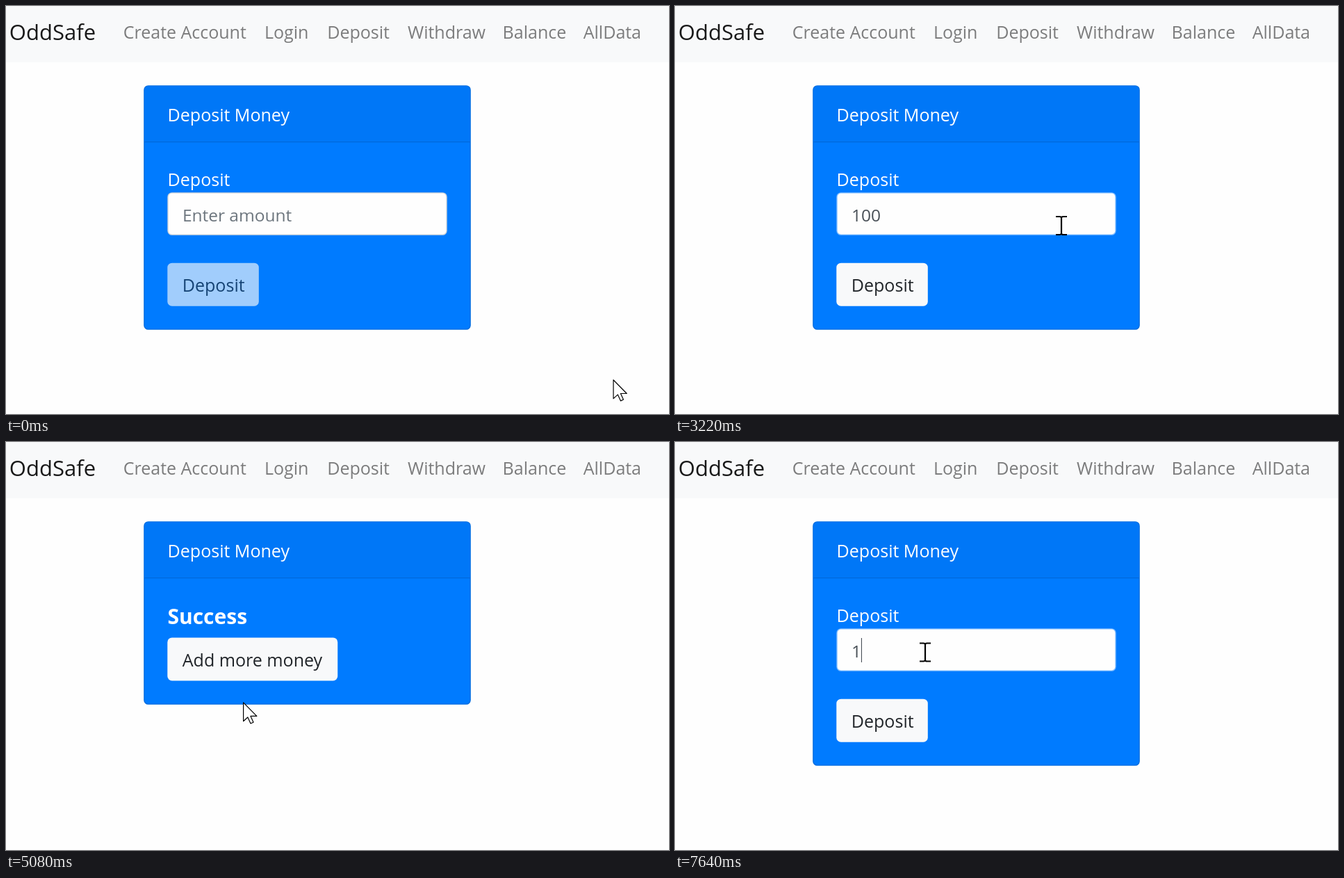
Animation, 954 px wide and 587 px high, one loop 8 s. Source, as an HTML page with a canvas:

```html
<!DOCTYPE html>
<html lang="en">
<head>
<meta charset="utf-8">
<title>Deposit Money</title>
<style>
  html, body { margin: 0; width: 100%; height: 100%; overflow: hidden; background: #fefefe; }
  canvas { display: block; }
</style>
</head>
<body>
<canvas id="stage" width="954" height="587"></canvas>
<script>
const ctx = document.getElementById('stage').getContext('2d');
const LOOP = 8000;
const INPUT = { x: 232.3, y: 268.2, w: 402.4, h: 61.6 };
const DEPOSIT = { x: 232.3, y: 369.7, w: 131.5, h: 62 };
const ADD = { x: 232.3, y: 281.4, w: 244.9, h: 62 };
const RADIUS = 6.5;

// Pointer moves: start, end, number of visible steps, destination
const START = [874, 538];
const MOVES = [
  [70, 870, 12, 550, 309],
  [950, 1400, 7, 556, 316],
  [3550, 4310, 12, 339, 390],
  [4920, 5550, 10, 351, 320],
  [5890, 5891, 1, 354, 322],
  [6290, 6430, 3, 356, 300],
  [7040, 7180, 3, 360, 302.5]
];
const CLICKS = [[870, 1010], [4380, 4590], [5750, 5890], [6630, 6770]];
const CARET = [[870, 1410], [1940, 3220], [3750, 4280], [6630, 7160], [7640, LOOP]];
const TYPED = [[0, ''], [2360, '1'], [2490, '10'], [2690, '100'], [5890, ''], [7640, '1']];

const clamp = v => Math.max(0, Math.min(1, v));
const smooth = p => p * p * (3 - 2 * p);
const within = (t, spans) => spans.some(([a, b]) => t >= a && t < b);
const inside = (x, y, r) => x >= r.x && x <= r.x + r.w && y >= r.y && y <= r.y + r.h;
const mix = (a, b, p) => `rgb(${a.map((v, i) => Math.round(v + (b[i] - v) * p))})`;

function text(str, x, y, color, size = 25, weight = 400) {
  ctx.font = `${weight} ${size}px "Open Sans", "Noto Sans", sans-serif`;
  ctx.fillStyle = color;
  ctx.fillText(str, x, y);
}

function box(x, y, w, h, r, color) {
  ctx.fillStyle = color;
  ctx.beginPath();
  ctx.roundRect(x, y, w, h, r);
  ctx.fill();
}

function bordered({ x, y, w, h }, border, fill) {
  const b = 1.4;
  box(x, y, w, h, RADIUS, border);
  box(x + b, y + b, w - 2 * b, h - 2 * b, RADIUS - b, fill);
}

function pointer(t) {
  let [x, y] = START;
  for (const [a, b, n, tx, ty] of MOVES) {
    if (t < a) break;
    const step = Math.floor(clamp((t - a) / (b - a)) * (n - 1)) + 1;
    const p = smooth(step / n);
    x += (tx - x) * p;
    y += (ty - y) * p;
  }
  return [x, y];
}

function navbar() {
  ctx.fillStyle = '#f8f9fa';
  ctx.fillRect(0, 0, 954, 81);
  text('OddSafe', 4.8, 49, 'rgba(0,0,0,.9)', 31);
  const links = { 'Create Account': 168.8, Login: 372, Deposit: 462.2, Withdraw: 578, Balance: 714.6, AllData: 830.7 };
  for (const name in links) text(name, links[name], 47, 'rgba(0,0,0,.5)');
}

function card(height) {
  bordered({ x: 198.2, y: 114.2, w: 470.6, h: height }, '#006cdf', '#007bff');
  box(199.6, 115.6, 467.8, 79.4, [5, 5, 0, 0], '#0077f7');
  ctx.fillStyle = '#0068d9';
  ctx.fillRect(199, 195, 469, 1.2);
  text('Deposit Money', 232.6, 166, '#fff');
}

function button(rect, label, t, hoverAt, pressAt) {
  const hover = clamp((t - hoverAt) / 150);
  const press = clamp((t - pressAt) / 150);
  if (press > 0) {
    const grow = 1 - (1 - press) ** 2;
    const ring = 4 * grow;
    box(rect.x - ring, rect.y - ring, rect.w + 2 * ring, rect.h + 2 * ring, RADIUS + ring, `rgba(215,217,218,${0.38 * grow})`);
  }
  const fill = press > 0
    ? mix([226, 230, 234], [218, 224, 229], press)
    : mix([248, 249, 250], [226, 230, 234], hover);
  box(rect.x, rect.y, rect.w, rect.h, RADIUS, fill);
  text(label, 253.8, Math.round(rect.y + 41.3), '#212529');
}

function form(t) {
  card(351.6);
  text('Deposit', 232.6, 259, '#fff');

  const focus = t < 4380 ? clamp((t - 870) / 150)
    : t < 5890 ? 1 - clamp((t - 4380) / 120)
    : clamp((t - 6630) / 150);
  bordered(INPUT, mix([206, 212, 218], [128, 189, 255], focus), '#fefefe');

  const value = TYPED.filter(([at]) => t >= at).pop()[1];
  text(value || 'Enter amount', 253.9, 310, value ? '#495057' : '#6c757d', 24.5);
  if (within(t, CARET)) {
    ctx.fillStyle = '#495057';
    ctx.fillRect(254 + 13.9 * value.length, 282, 1.1, 35);
  }

  if (value) {
    button(DEPOSIT, 'Deposit', t, t < 5890 ? 4140 : Infinity, t < 5890 ? 4380 : Infinity);
  } else {
    box(DEPOSIT.x, DEPOSIT.y, DEPOSIT.w, DEPOSIT.h, RADIUS, '#a1cdfc');
    text('Deposit', 253.8, 411, '#154374');
  }
}

function success(t) {
  card(263.6);
  text('Success', 232.4, 262, '#fff', 30, 700);
  button(ADD, 'Add more money', t, 5300, 5750);
}

function shape(d, scale = 1) {
  const path = new Path2D(d);
  ctx.scale(scale, scale);
  ctx.fillStyle = '#fff';
  ctx.strokeStyle = '#000';
  ctx.lineWidth = 1.2 / scale;
  ctx.lineJoin = 'round';
  ctx.fill(path);
  ctx.stroke(path);
}

function arrow() {
  shape('M0 0V16.8L3.9 13.2L6.5 18.8L9 17.7L6.5 12.2H12Z', 1.6);
}

function hand() {
  shape('M-3 3Q-3 0 0 0Q3 0 3 3V12Q4 10.5 6 11Q8 11.5 8 13Q9.5 11.5 11 12Q13 12.5 13 14.5Q17 13 17 17V26Q17 29 15 32Q13 37 8 37H3Q-1 37 -3 33Q-5 28 -10 23Q-12 20 -10 18.5Q-7 17 -3 22Z');
  ctx.beginPath();
  for (const [x, y] of [[3, 12], [8, 13], [13, 14.5]]) {
    ctx.moveTo(x, y);
    ctx.lineTo(x, y + 6);
  }
  ctx.stroke();
}

function beam() {
  ctx.strokeStyle = '#000';
  ctx.lineWidth = 2.2;
  ctx.stroke(new Path2D('M-8 -13H-2.5Q0 -13 0 -11Q0 -13 2.5 -13H8M0 -11V11M-8 13H-2.5Q0 13 0 11Q0 13 2.5 13H8'));
}

function cursor(x, y, onForm) {
  const overButton = inside(x, y, onForm ? DEPOSIT : ADD);
  const draw = overButton ? hand : onForm && inside(x, y, INPUT) ? beam : arrow;
  ctx.save();
  ctx.translate(x, y);
  draw();
  ctx.restore();
}

function render(t) {
  const onForm = t < 4590 || t >= 5890;
  const [x, y] = pointer(t);
  ctx.fillStyle = '#fefefe';
  ctx.fillRect(0, 0, 954, 587);
  navbar();
  (onForm ? form : success)(t);
  cursor(x, y, onForm);
  if (within(t, CLICKS)) box(x - 19.5, y - 19.5, 39, 39, 19.5, 'rgba(255,255,0,.49)');
}

const begin = performance.now();
function tick() {
  render((performance.now() - begin) % LOOP);
  requestAnimationFrame(tick);
}
tick();
</script>
</body>
</html>
```
